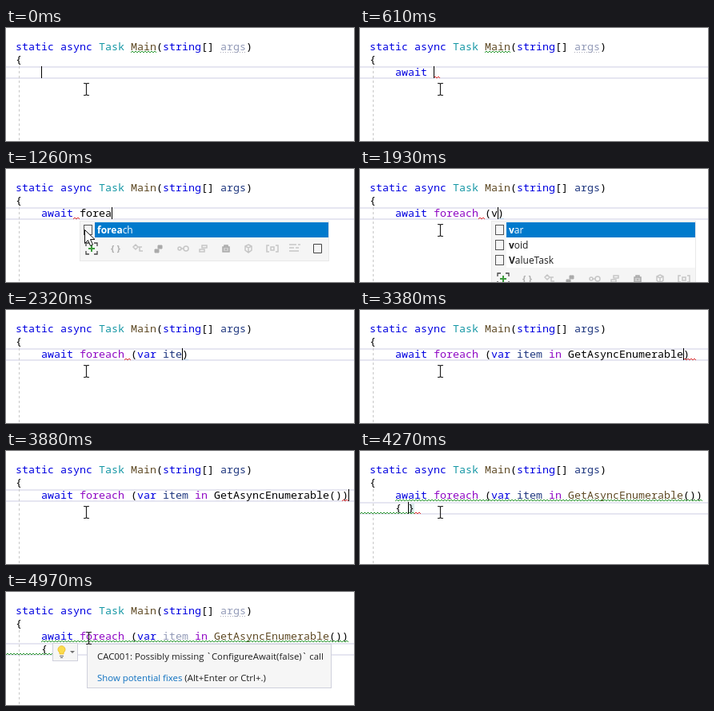
Animation, 435 px wide and 142 px high, one loop 6230 ms. Source, as an HTML page:

```html
<!DOCTYPE html>
<html lang="en">
<head>
<meta charset="utf-8">
<title>Typing await foreach</title>
<style>
html, body { margin: 0; width: 100%; height: 100%; overflow: hidden; background: #fff; }
svg { display: block; width: 435px; height: 142px; }
text { white-space: pre; }
.code { font: 500 13.333px "Noto Sans Mono", monospace; }
.ui { font: 11.4px "Open Sans", sans-serif; fill: #1e1e1e; }
.item { font-size: 12px; }
.selected { fill: #fff; }
.glyph { fill: #b0b0b0; font-weight: 700; }
.keyword { fill: #0000e0; }
.control { fill: #8f08c4; }
.type { fill: #1597a5; }
.method { fill: #5f4a25; }
.local { fill: #1f377f; }
.unused { fill: #939bb8; }
.panel { fill: #f6f6f6; stroke: #cfd0dc; }
.popup { fill: #f5f5f5; stroke: #e9e9e9; }
.faint { fill: none; stroke: #c6c6c6; stroke-width: 1.5; }
</style>
</head>
<body>
<svg id="stage" viewBox="0 0 435 142"></svg>
<script>
const LOOP = 6230, CHAR = 8, INDENT = 44;
const stage = document.getElementById('stage');
const list = (x, width, typed, ...items) => ({ x, width, typed, items, toolbar: true });

const call = 'await foreach (var item in GetAsyncEnumerable';
const initial = {
  code: '', tail: '', row: 0, block: '', blockTail: '', popup: null, hint: false,
  analysed: true, mainWarning: true, red: null, missing: false, resolved: false,
  mouse: [100, 77], bulb: false, tooltip: false
};

// Each step: start time, then what changes from the step before.
const changes = [
  [0, {}],
  [270, { code: 'a' }],
  [330, { popup: list(44, 312, 1, 'args', 'async', 'await', 'Array') }],
  [380, { code: 'aw', popup: list(44, 312, 2, 'await') }],
  [440, { code: 'awa', popup: list(44, 312, 3, 'await') }],
  [500, { code: 'awai', popup: list(44, 312, 4, 'await') }],
  [550, { code: 'await', popup: list(44, 312, 5, 'await') }],
  [610, { code: 'await ', popup: null, red: [92, 101] }],
  [880, { code: 'await f', red: [84, 92] }],
  [950, { popup: list(92, 312, 1, 'false', 'float', 'for', 'foreach') }],
  [1010, { code: 'await fo', popup: list(92, 312, 2, 'for', 'foreach') }],
  [1070, { code: 'await for', popup: list(92, 312, 3, 'for', 'foreach') }],
  [1130, { code: 'await fore', popup: list(92, 312, 4, 'foreach') }],
  [1200, { analysed: false, mainWarning: false }],
  [1260, { code: 'await forea', popup: list(92, 312, 5, 'foreach') }],
  [1320, { code: 'await foreac', popup: list(92, 312, 6, 'foreach') }],
  [1400, { code: 'await foreach', popup: list(92, 312, 7, 'foreach') }],
  [1600, { code: 'await foreach ', popup: null }],
  [1820, { code: 'await foreach (', tail: ')', red: [148, 156] }],
  [1880, { code: 'await foreach (v', popup: list(164, 256, 1, 'var', 'void', 'ValueTask') }],
  [1940, { code: 'await foreach (va', popup: list(164, 256, 2, 'var', 'ValueTask') }],
  [2000, { code: 'await foreach (var', popup: list(164, 256, 3, 'var') }],
  [2060, { code: 'await foreach (var ', popup: null }],
  [2130, { code: 'await foreach (var i' }],
  [2200, { code: 'await foreach (var it' }],
  [2320, { code: 'await foreach (var ite' }],
  [2380, { code: 'await foreach (var item' }],
  [2430, { red: [228, 237] }],
  [2490, { code: 'await foreach (var item ' }],
  [2570, { code: 'await foreach (var item i', popup: { ...list(236, 52, 1, 'in'), toolbar: false } }],
  [2640, { code: 'await foreach (var item in', popup: { ...list(236, 52, 2, 'in'), toolbar: false } }],
  [2710, { code: 'await foreach (var item in ', popup: null, red: null }],
  [2880, { code: call.slice(0, 28), popup: list(260, 312, 1, 'GetAsyncEnumerable', 'GC', 'Guid', 'GetHashCode') }],
  [2950, { code: call.slice(0, 29), popup: list(260, 312, 2, 'GetAsyncEnumerable', 'GetHashCode', 'GetType') }],
  [3020, { code: call.slice(0, 30), popup: list(260, 312, 3, 'GetAsyncEnumerable', 'GetHashCode') }],
  [3090, { code: call.slice(0, 31), popup: list(260, 312, 4, 'GetAsyncEnumerable', 'GetHashCode') }],
  [3380, { code: call, popup: null, red: [404, 421] }],
  [3550, { code: call + '(', tail: '))', red: [420, 429] }],
  [3610, { hint: true }],
  [3720, { code: call + '()', tail: ')', hint: false }],
  [3880, { code: call + '())', tail: '' }],
  [3990, { row: 1, red: null }],
  [4090, { block: '{', blockTail: '}' }],
  [4180, { block: '{ ', red: [68, 77] }],
  [4270, { missing: true, resolved: true }],
  [4430, { analysed: true }],
  [4480, { red: null }],
  [4700, { bulb: true }],
  [4760, { mouse: [101, 72] }],
  [4830, { mouse: [102, 64] }],
  [4900, { mouse: [103, 58] }],
  [4970, { tooltip: true }]
];
let last = initial;
const steps = changes.map(([time, change]) => ({ time, state: last = { ...last, ...change } }));

const rect = (x, y, w, h, attrs) => `<rect x="${x}" y="${y}" width="${w}" height="${h}" ${attrs}/>`;
const path = (d, attrs) => `<path d="${d}" ${attrs}/>`;
const label = (x, y, content, kind) => `<text x="${x}" y="${y}" class="${kind}">${content}</text>`;

function squiggle(from, to, y, color) {
  let d = `M${from} ${y + 2}`;
  for (let x = from + 2, up = true; x <= to; x += 2, up = !up) d += `L${x} ${up ? y : y + 2}`;
  return path(d, `fill="none" stroke="${color}"`);
}

function colorize(code, { analysed, resolved }) {
  const kinds = [
    [/^(static|async|string|await|var)$/, 'keyword'],
    [/^(foreach|in)$/, 'control'],
    [/^Task$/, 'type'],
    [/^args$/, analysed ? 'unused' : 'local'],
    [/^(i|it|ite|item)$/, analysed ? 'unused' : 'local'],
    [/^Main$/, 'method'],
    [/^GetAsyncEnumerable$/, resolved ? 'method' : '']
  ];
  return code.replace(/\w+/g, word => {
    const kind = kinds.find(([pattern]) => pattern.test(word));
    return kind ? `<tspan class="${kind[1]}">${word}</tspan>` : word;
  });
}

function toolbar(x, y, width) {
  const at = (dx, d, attrs = 'class="faint"') => path(`M${x + dx} ${y}${d}`, attrs);
  const dark = 'fill="none" stroke="#444" stroke-width="1.3"';
  let icons = at(15, 'm-7 -3v-4h4m6 0h4v4m0 6v4h-4m-6 0h-4v-4', dark)
    + at(15, 'm-4 0h8m-4 -4v8', 'stroke="#3c9a3c" stroke-width="2"')
    + label(x + 39, y + 4, '{ }', 'ui glyph')
    + at(73, 'm-6 -2l3 -3 3 3 -3 3zm6 0h5m-3 0v5h4')
    + at(99, 'm-5 1h5v4h-5zm4 -5h5v4h-5z', 'fill="#aaa" stroke="#aaa"')
    + at(129, 'm-6 0a2 2 0 1 0 4 0a2 2 0 1 0 -4 0m4 0h3m0 0a3 3 0 1 0 6 0a3 3 0 1 0 -6 0')
    + at(155, 'm-5 1h6v3h-6zm3 -5h6v3h-6z')
    + at(183, 'm-4 -2h8v6h-8zm2 0v-2h4v2m-2 2v2', 'fill="#ccc" stroke="#aaa" stroke-width="1.5"')
    + at(211, 'm0 -5l4 2v5l-4 3 -4 -3v-5zm-4 2l4 2 4 -2m-4 2v5')
    + at(241, 'm-4 -4h-3v8h3m8 -8h3v8h-3m-6 -6h4v4h-4z');
  if (width > 300) {
    icons += at(269, 'm-7 -5h9m2 0h3m-14 4h6m2 0h4m-12 4h12')
      + at(297.5, 'm-5 -5.5h10v11h-10z', 'fill="none" stroke="#444"');
  }
  return icons;
}

function drawPopup({ x, width, typed, items, toolbar: hasToolbar }) {
  const listHeight = items.length * 19 + 3;
  let out = rect(x + .5, 65.5, width - 1, listHeight + (hasToolbar ? 28 : -1), 'class="popup"');
  items.forEach((item, i) => {
    const y = 67 + i * 19, selected = i === 0;
    out += rect(x + 19, y, width - 20, 19, `fill="${selected ? '#007acc' : '#fff'}"`)
      + rect(x + 5.5, y + 3.5, 10, 12, 'fill="none" stroke="#555"')
      + label(x + 22, y + 14, `<tspan font-weight="700">${item.slice(0, typed)}</tspan>${item.slice(typed)}`,
        selected ? 'ui item selected' : 'ui item');
  });
  return hasToolbar ? out + toolbar(x, 65 + listHeight + 13, width) : out;
}

function drawMouse([x, y], arrow) {
  return arrow
    ? path(`M${x - 1.5} ${y - .5}v17l4 -4 3 7 3 -1.5 -3 -6.5h5.5z`, 'fill="#fff" stroke="#111"')
    : path(`M${x - 3} ${y - 7.5}h2.5l1 1 1 -1h2.5m-3.5 1v13m-3.5 1h2.5l1 -1 1 1h2.5`,
      'fill="none" stroke="#222" stroke-width="1.2"');
}

function drawBulb() {
  return rect(58.5, 64.5, 31, 22, 'class="panel"')
    + path('M67 78v-2a4.5 4.5 0 1 1 5 0v2z', 'fill="#fbdc4c" stroke="#f0c02e"')
    + path('M67 80.5h5m-4 2h3', 'stroke="#666"')
    + path('M80 74h6l-3 3z', 'fill="#717171"');
}

function drawTooltip() {
  return rect(101.5, 65.5, 305, 55, 'class="panel"')
    + label(114, 85, 'CAC001: Possibly missing `ConfigureAwait(false)` call', 'ui')
    + label(114, 112, '<tspan fill="#0e70c0">Show potential fixes</tspan> (Alt+Enter or Ctrl+.)', 'ui');
}

function draw(state) {
  const { code, tail, row, block, blockTail, popup, red, mouse } = state;
  const top = row ? 64 : 48;
  const caret = INDENT + CHAR * (row ? block : code).length;
  const green = '#2f9a35';
  let out = rect(-2, top + 1, 439, 14, 'fill="none" stroke="#e6e6f1" stroke-width="2"')
    + path('M16.5 48V142', 'stroke="#c8c8c8" stroke-dasharray="3 3"');
  if (blockTail) {
    out += rect(caret, 66, 8, 12, 'fill="#dcebec"');
  } else if (tail) {
    out += rect(caret, 62, 8, 1, 'fill="#b9d3ea"');
  }
  out += label(12, 28, colorize('static async Task Main(string[] args)', state), 'code')
    + label(12, 44, '{', 'code')
    + label(INDENT, 60, colorize(code + tail, state), 'code')
    + label(INDENT, 76, block + blockTail, 'code');
  if (state.mainWarning) out += squiggle(156, 188, 29, green);
  if (state.analysed) out += path('M268 30.5H300', 'stroke="#aaaab8" stroke-dasharray="1 2"');
  if (state.missing) out += squiggle(44, 428, 61, green) + squiggle(0, 68, 77, green);
  if (red) out += squiggle(...red, row ? 77 : 61, '#e03030');
  out += rect(caret, top, 1, 15, 'fill="#000"');
  if (popup) out += drawPopup(popup);
  if (state.hint) {
    out += rect(268.5, 65.5, 170, 23, 'class="panel"')
      + label(276, 81, '(): IAsyncEnumerable&lt;int&gt;', 'ui');
  }
  if (state.bulb) out += drawBulb();
  if (state.tooltip) out += drawTooltip();
  stage.innerHTML = out + drawMouse(mouse, popup && popup.x < mouse[0]);
}

const start = performance.now();
let shown = null;
function tick() {
  const time = (performance.now() - start) % LOOP;
  const step = steps.findLast(s => s.time <= time);
  if (step !== shown) draw((shown = step).state);
  requestAnimationFrame(tick);
}
tick();
</script>
</body>
</html>
```
